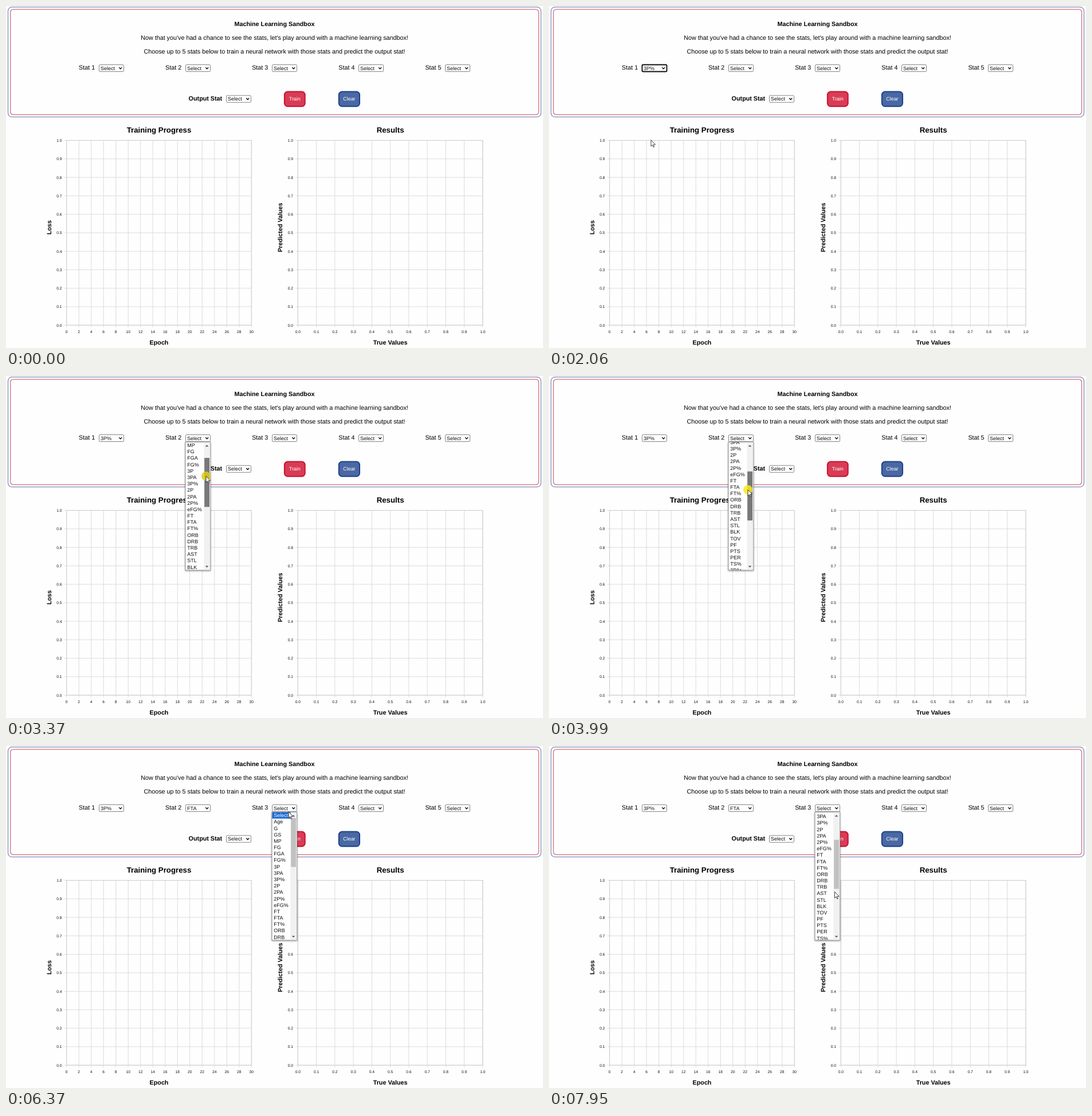
An HTML page for the animation above (8 s loop, 937 px wide and 597 px high).

```html
<!DOCTYPE html>
<html lang="en">
<head>
<meta charset="utf-8">
<title>Machine Learning Sandbox</title>
<style>
  html, body { margin: 0; width: 100%; height: 100%; overflow: hidden; background: #fefefe; }
  svg { display: block; width: 937px; height: 597px; }
  text { font-family: "Liberation Sans", Arial, sans-serif; font-size: 10.77px; fill: #000; text-rendering: geometricPrecision; }
  .bold { font-weight: bold; }
  .heading { font-weight: bold; font-size: 13.25px; }
  .tick { font-size: 6.73px; fill: #111; }
  .control { font-size: 8.97px; fill: #111; }
  .mid { text-anchor: middle; }
  .end { text-anchor: end; }
  .shadow { filter: drop-shadow(0 1.5px 1.8px rgba(0, 0, 0, .4)); }
</style>
</head>
<body>
<svg id="stage" viewBox="0 0 937 597"></svg>
<script>
const LOOP = 8000;
const ROW = 11.18, LIST_TOP = 115.5, LIST_HEIGHT = 223, THUMB_TOP = 125.6, THUMB_RATIO = 0.387;
const STATS = ("Select Age G GS MP FG FGA FG% 3P 3PA 3P% 2P 2PA 2P% eFG% FT FTA FT% ORB DRB TRB AST STL " +
  "BLK TOV PF PTS PER TS% 3PAr FTr ORB% DRB% TRB%").split(" ");

const stage = document.getElementById("stage");

function add(tag, attrs = {}, parent = stage) {
  const node = document.createElementNS("http://www.w3.org/2000/svg", tag);
  set(node, attrs);
  parent.appendChild(node);
  return node;
}
function set(node, attrs) {
  for (const name in attrs) node.setAttribute(name, attrs[name]);
}
function label(x, y, content, cls = "", parent = stage, extra = {}) {
  const node = add("text", { x, y, class: cls, ...extra }, parent);
  node.textContent = content;
  return node;
}
function box(x, y, width, height, attrs, parent = stage) {
  return add("rect", { x, y, width, height, ...attrs }, parent);
}
function show(node, visible) {
  node.style.display = visible ? "" : "none";
}

// Form panel
box(3.5, 1.8, 930, 191.9, { rx: 7, fill: "none", stroke: "#7d90bb", "stroke-width": 1.3 });
box(7.7, 5.8, 921.8, 183.9, { rx: 5, fill: "none", stroke: "#db6a7c", "stroke-width": 1.3 });
label(468.5, 35, "Machine Learning Sandbox", "bold mid");
label(468.5, 59.3, "Now that you've had a chance to see the stats, let's play around with a machine learning sandbox!", "mid");
label(468.5, 83.3, "Choose up to 5 stats below to train a neural network with those stats and predict the output stat!", "mid");

function selectBox(x, y) {
  const frame = box(x, y, 43, 12, { rx: 1.7, fill: "#fff" });
  const value = label(x + 2.6, y + 9.2, "Select", "control");
  add("path", { d: `M${x + 34.7} ${y + 4.6}l2.5 2.7 2.5-2.7`, fill: "none", stroke: "#000", "stroke-width": 1.3 });
  return {
    update(text, focused) {
      value.textContent = text;
      set(frame, { stroke: focused ? "#101010" : "#767676", "stroke-width": focused ? 1.9 : 0.9 });
    }
  };
}
const selects = [1, 2, 3, 4, 5].map((n, i) => {
  label(127 + 151.1 * i, 111.4, "Stat " + n);
  return selectBox(162.5 + 151 * i, 102.5);
});
label(318.6, 165.3, "Output Stat", "bold");
const outputSelect = selectBox(384.5, 156.2);

function button(x, width, text, fill, stroke) {
  box(x, 149.6, width, 25.6, { rx: 5.5, fill, stroke, "stroke-width": 2 });
  label(x + width / 2, 165.4, text, "control mid", stage, { style: "fill:#fff" });
}
button(485.9, 35.8, "Train", "#d93c56", "#c8102e");
button(580.8, 36.2, "Clear", "#4a68a3", "#1d428a");

// Charts
function chart(left, title, xName, yName, yNameX, columns, xText) {
  const top = 234.6, size = 322.6, bottom = top + size;
  let grid = "";
  for (let i = 0; i <= 10; i++) {
    const y = top + size * i / 10;
    grid += `M${left - 4} ${y}H${left + size}`;
    label(left - 8.2, y + 2.4, (1 - i / 10).toFixed(1), "tick end");
  }
  for (let i = 0; i <= columns; i++) {
    const x = left + size * i / columns;
    grid += `M${x} ${top}V${bottom + 4}`;
    label(x, 570.6, xText(i), "tick mid");
  }
  add("path", { d: grid, fill: "none", stroke: "#dcdcdc" });
  box(left, top, size, size, { fill: "none", stroke: "#cfcfcf" });
  label(left + size / 2, 221, title, "heading mid");
  label(left + size / 2, 590.8, xName, "bold mid");
  label(0, 0, yName, "bold mid", stage, { transform: `translate(${yNameX} 386.5) rotate(-90)` });
}
chart(105.7, "Training Progress", "Epoch", "Loss", 78.5, 15, i => 2 * i);
chart(509.3, "Results", "True Values", "Predicted Values", 482.3, 10, i => (i / 10).toFixed(1));

// Dropdown list, drawn at the first select and shifted to the open one
const clip = add("clipPath", { id: "listClip" }, add("defs"));
box(162, LIST_TOP, 43.5, LIST_HEIGHT, {}, clip);
const popup = add("g");
box(162, 115.2, 43.7, 223.8, { fill: "#fff", stroke: "#8a8a8a", "stroke-width": 0.9, class: "shadow" }, popup);
const viewport = add("g", { "clip-path": "url(#listClip)" }, popup);
const list = add("g", {}, viewport);
const hover = box(162.5, 0, 43, ROW, { fill: "#1967d2" }, list);
const items = STATS.map((name, i) => label(165.3, LIST_TOP + ROW * i + 8.7, name, "control", list));
box(194.4, 115.7, 10.8, 222.8, { fill: "#f1f1f1" }, popup);
add("path", { d: "M196.7 123.3l2.8-2.9 2.8 2.9zM196.7 331.4l2.8 2.9 2.8-2.9z", fill: "#505050" }, popup);
const thumb = box(195.2, 0, 8.8, 85.6, {}, popup);

// Pointer
const halo = add("circle", { r: 8, "fill-opacity": 0.85 });
const pointer = add("path", {
  d: "M0 0V10.8L2.5 8.5 4.1 12.4 5.8 11.7 4.2 7.9H7.6Z",
  fill: "#fff", stroke: "#222", "stroke-width": 0.85, "stroke-linejoin": "round"
});

const path = [
  [70, 880, 586], [580, 192, 104], [890, 192, 104], [1600, 178, 234], [2070, 178, 234],
  [2620, 345, 104], [2810, 345, 104], [3060, 349, 157.5], [3130, 349, 157.5], [3370, 349, 174.8],
  [3990, 347, 198.5], [5100, 347, 198.5], [5380, 326, 194], [5600, 326, 194], [5740, 361, 181],
  [5880, 474, 121], [6020, 492, 111], [6320, 492, 111], [6600, 503, 155.4], [6720, 503, 155.4],
  [7000, 502.5, 170], [7350, 502.5, 193.1], [7750, 502.5, 193.1], [7950, 498.5, 254.5]
];
const popups = [
  { index: 0, from: 700, to: 1990 },
  { index: 1, from: 2735, to: 5520, press: 3080, release: 4650, grab: 157.5 },
  { index: 2, from: 6190, to: LOOP, press: 6640, release: 7760, grab: 155.4 }
];
const clicks = [[640, 780], [1990, 2050], [2680, 2805], [3080, 4690], [5470, 5570], [6130, 6270], [6640, 7760]];

// Velocity at a key: zero at rests and ends, otherwise from its neighbours
function slope(i, axis) {
  const a = path[i - 1], b = path[i], c = path[i + 1];
  if (!a || !c) return 0;
  const before = b[axis] - a[axis], after = c[axis] - b[axis];
  return before * after <= 0 ? 0 : (before + after) / (c[0] - a[0]);
}
function position(t, axis) {
  const last = path.length - 1;
  if (t <= path[0][0]) return path[0][axis];
  if (t >= path[last][0]) return path[last][axis];
  const i = path.findIndex(key => key[0] > t) - 1;
  const [a, b] = [path[i], path[i + 1]], span = b[0] - a[0], u = (t - a[0]) / span;
  const u2 = u * u, u3 = u2 * u;
  return a[axis] + (b[axis] - a[axis]) * (3 * u2 - 2 * u3) +
    span * (slope(i, axis) * (u3 - 2 * u2 + u) + slope(i + 1, axis) * (u3 - u2));
}

function drawPopup(t, x, y) {
  const open = popups.find(p => t >= p.from && t < p.to);
  show(popup, open);
  if (!open) return;
  const shift = 151 * open.index, localX = x - shift;
  const dragged = open.press && t >= open.press;
  const dragging = dragged && t < open.release;
  const travel = dragged ? Math.max(0, position(Math.min(t, open.release), 2) - open.grab) : 0;
  const scroll = travel / THUMB_RATIO;
  const overItems = localX < 194.4 && y > LIST_TOP;
  const active = overItems ? Math.floor((y - LIST_TOP + scroll) / ROW) : 0;
  const thumbY = THUMB_TOP + travel;
  const overThumb = localX >= 194.4 && y >= thumbY && y <= thumbY + 85.6;

  set(popup, { transform: `translate(${shift} 0)` });
  set(list, { transform: `translate(0 ${-scroll})` });
  set(hover, { y: LIST_TOP + ROW * active });
  items.forEach((item, i) => { item.style.fill = i === active ? "#fff" : ""; });
  set(thumb, { y: thumbY, fill: dragging ? "#787878" : overThumb ? "#a8a8a8" : "#c1c1c1" });
}

function draw(t) {
  const x = position(t, 1), y = position(t, 2);
  selects.forEach((select, i) => {
    const value = i === 0 && t >= 1990 ? "3P%" : i === 1 && t >= 5520 ? "FTA" : "Select";
    const focused = i === 0 && t >= 1990 && t < 2735 || i === 1 && t >= 5520 && t < 6190;
    select.update(value, focused);
  });
  outputSelect.update("Select", false);
  drawPopup(t, x, y);

  const click = clicks.find(([from, to]) => t >= from && t < to);
  show(halo, click);
  if (click) set(halo, { cx: x, cy: y, fill: t - click[0] > 500 ? "#fbe71c" : "#dccb14" });
  show(pointer, t >= 70);
  set(pointer, { transform: `translate(${x} ${y})` });
}

const start = performance.now();
function tick() {
  draw((performance.now() - start) % LOOP);
  requestAnimationFrame(tick);
}
draw(0);
requestAnimationFrame(tick);
</script>
</body>
</html>
```
